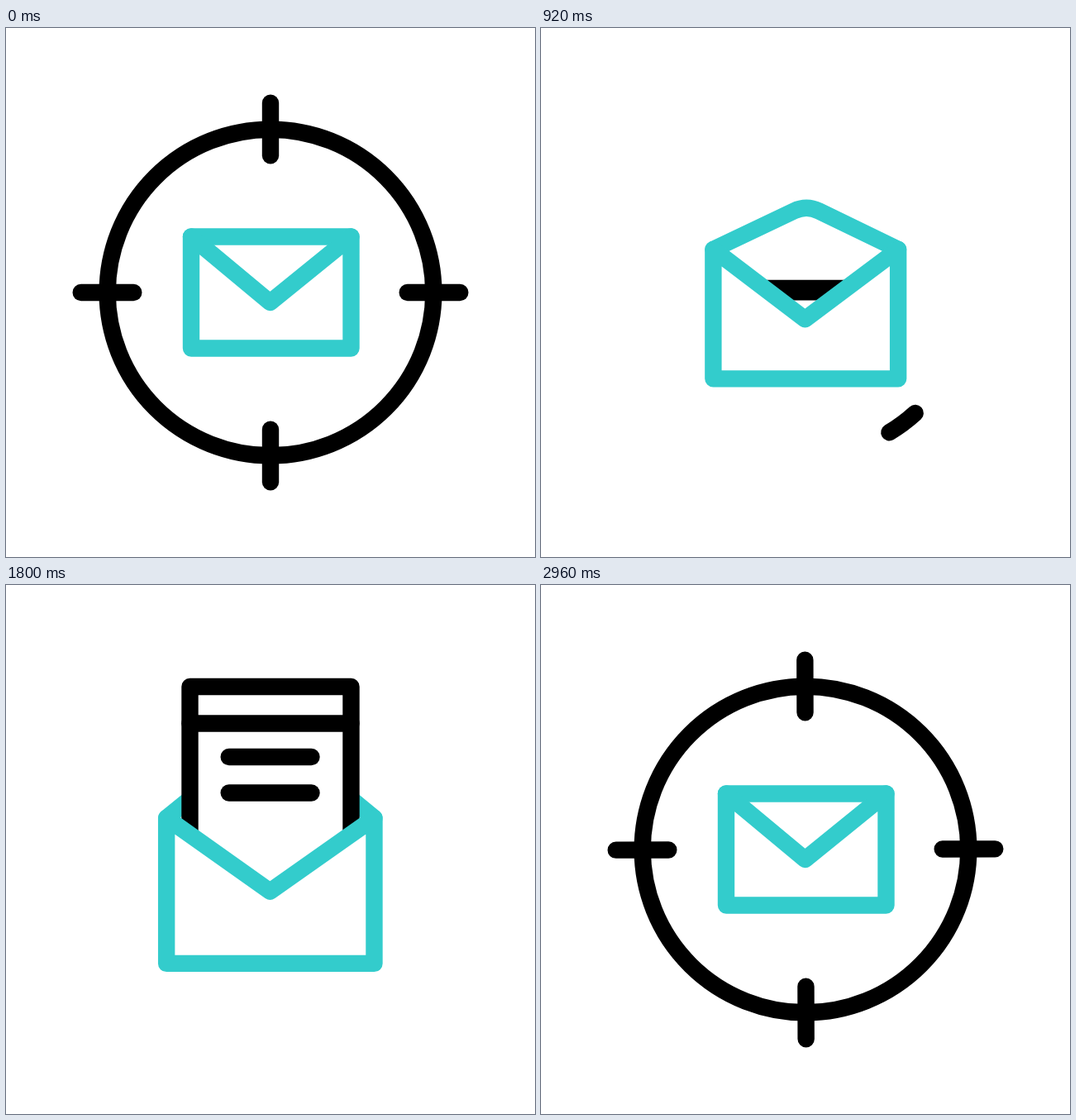
An HTML page with a canvas for the animation above (3 s loop, 640 px wide and 640 px high).

```html
<!DOCTYPE html>
<html lang="en">
<head>
<meta charset="utf-8">
<title>Mail target</title>
<style>
html, body { margin: 0; width: 100%; height: 100%; overflow: hidden; background: #fff; }
canvas { display: block; width: 100vmin; height: 100vmin; margin: auto; }
</style>
</head>
<body>
<canvas id="stage" width="640" height="640"></canvas>
<script>
const ctx = document.getElementById('stage').getContext('2d');
const LOOP = 3000, STEP = 40, BLACK = '#000', TEAL = '#33cccc';
const CX = 320, CY = 320, RING = 197.3, TICK_OUT = 229.3, TICK_LEN = 63.6;

// Keyframes: [time, value], eased in and out between neighbours.
const SPIN = [[138, 0], [568, 67], [1060, 43], [1500, -45], [1833, -45], [2256, 21.3], [2772, -2], [3000, 0]];
const OPEN = [[702, 0], [1145, 1], [1720, 1], [2225, 0]];
const PAGE = [[702, 345], [1648, 123], [1810, 123], [2374, 345]];
const HEAD = [[702, 343], [1648, 167.5], [1810, 167.5], [2374, 447]];

const clamp = x => Math.min(1, Math.max(0, x));
const smooth = u => u * u * (3 - 2 * u);

function track(keys, t) {
  if (t <= keys[0][0]) return keys[0][1];
  for (let i = 1; i < keys.length; i++) {
    const [t0, a] = keys[i - 1], [t1, b] = keys[i];
    if (t < t1) return a + (b - a) * smooth((t - t0) / (t1 - t0));
  }
  return keys[keys.length - 1][1];
}

function trace(points) {
  ctx.beginPath();
  points.forEach(([x, y]) => ctx.lineTo(x, y));
}

function line(points, color) {
  trace(points);
  ctx.strokeStyle = color;
  ctx.stroke();
}

// Share of the ring that is drawn.
function ringPart(t) {
  if (t < 1400) return t < 160 ? 1 : 1 - Math.min(1, ((t + 575) / 1501) ** 8);
  return 1 - (1 - clamp((t - 1839) / 559)) ** 1.5;
}

// Share of a tick: 0 right, 1 bottom, 2 left, 3 top.
function tickPart(i, t) {
  if (t < 1400) return 1 - clamp((t - 344 - 80 * (3 - i)) / 330);
  return clamp((t - 1857 - 82 * i) / 368);
}

function drawTarget(t) {
  ctx.save();
  ctx.translate(CX, CY);
  ctx.rotate(track(SPIN, t) * Math.PI / 180);
  ctx.strokeStyle = BLACK;
  const part = ringPart(t);
  if (part > 0) {
    ctx.beginPath();
    ctx.arc(0, 0, RING, 0, part * 2 * Math.PI);
    ctx.stroke();
  }
  for (let i = 0; i < 4; i++) {
    const k = tickPart(i, t);
    if (k > 0) line([[TICK_OUT, 0], [TICK_OUT - TICK_LEN * k, 0]], BLACK);
    ctx.rotate(Math.PI / 2);
  }
  ctx.restore();
}

function drawPage(t, left, right, top, tip) {
  const y = track(PAGE, t), head = track(HEAD, t);
  ctx.save();
  trace([[left - 10, 0], [right + 10, 0], [right + 10, top], [right, top],
    tip, [left, top], [left - 10, top]]);
  ctx.clip();
  trace([[222.5, 520], [222.5, y], [417.5, y], [417.5, 520]]);
  ctx.fillStyle = '#fff';
  ctx.fill();
  ctx.strokeStyle = BLACK;
  ctx.stroke();
  line([[222.5, head], [417.5, head]], BLACK);
  for (const gap of [40.5, 84]) line([[269.7, head + gap], [369.5, head + gap]], BLACK);
  ctx.restore();
}

function drawEnvelope(t) {
  const p = track(OPEN, t);
  const left = 224 - 32 * p, right = 417.5 + 30 * p;
  const top = 252.5 + 31.5 * p, bottom = 387.5 + 75.5 * p;
  const tip = [319.5, 332 + 41.5 * p];

  ctx.strokeStyle = TEAL;
  ctx.beginPath();
  ctx.moveTo(left, top);
  ctx.arcTo((left + right) / 2 + 1, top - 110 * p, right, top, 35);
  ctx.lineTo(right, top);
  ctx.stroke();

  if (t > 702 && t < 2374) drawPage(t, left, right, top, tip);

  trace([[left, top], tip, [right, top], [right, bottom], [left, bottom]]);
  ctx.closePath();
  ctx.strokeStyle = TEAL;
  ctx.stroke();
}

function frame(now) {
  const t = Math.floor((now % LOOP) / STEP) * STEP;
  ctx.fillStyle = '#fff';
  ctx.fillRect(0, 0, 640, 640);
  ctx.lineWidth = 20.4;
  ctx.lineCap = ctx.lineJoin = 'round';
  drawEnvelope(t);
  drawTarget(t);
}

const start = performance.now();
function loop() {
  frame(performance.now() - start);
  requestAnimationFrame(loop);
}
loop();
</script>
</body>
</html>
```
